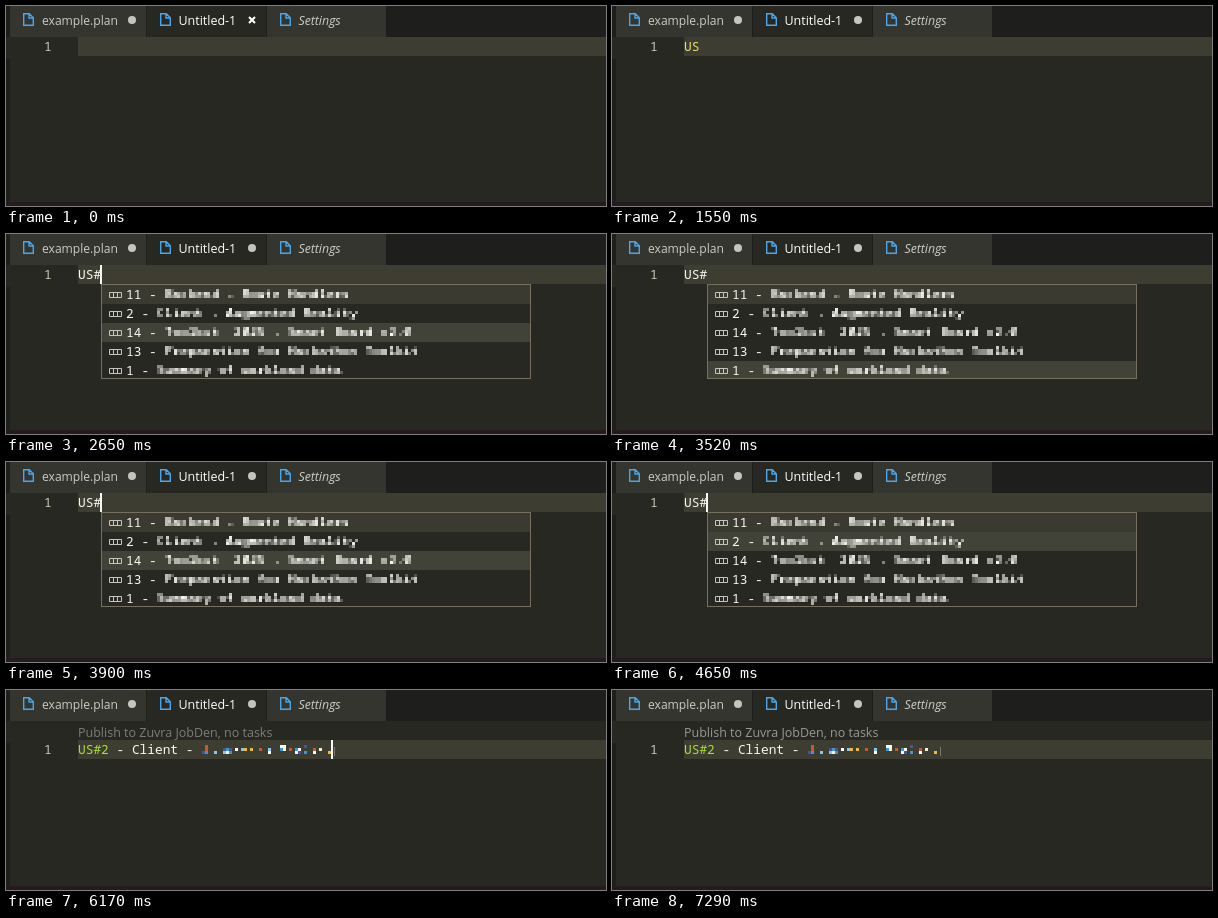
Animation of 600 by 200 pixels, one loop 7.42 s. Source, as an HTML page with a canvas:

```html
<!DOCTYPE html>
<html lang="en">
<head>
<meta charset="utf-8">
<title>Plan editor</title>
<style>
  html, body { margin: 0; width: 100%; height: 100%; overflow: hidden; background: #272822; }
  canvas { display: block; width: 600px; height: 200px; }
</style>
</head>
<body>
<canvas id="stage" width="600" height="200"></canvas>
<script>
const LOOP = 7420;
const CHAR = 7.7, CELL = 3, LEFT = 72;
const MONO = '12.83px "Noto Sans Mono", "DejaVu Sans Mono", monospace';
const ui = (size, style = '') => `${style} ${size}px "Open Sans", "Noto Sans", sans-serif`;
const WHITE = '#f8f8f2', YELLOW = '#e6db74', GREEN = '#a6e22e', GREY = '#c5c5c0';
const BLOCKS = ['#ffffff', '#fbf3cf', '#ffffff', '#3f97d0', '#c9572f', '#e9b949', '#f4f4ea', '#8ec3e6', '#4552a8'];

const ITEMS = [
  ['11', 'Backend - Route Handlers'],
  ['2', 'Client - Augmented Reality'],
  ['14', 'Toolkit  2025 - Smart Board v2.0'],
  ['13', 'Preparation for Hackathon Toolkit'],
  ['1', 'Summary of workload data'],
];
const PREFIX = 'US#2', MIDDLE = ' - Client - ', TOPIC = 'Augmented Reality';

// Each list holds [start time, value]; a value stays until the next entry.
const typed = [[0, ''], [980, 'U'], [1050, 'US'], [1680, 'US#'], [4770, PREFIX]];
const typedColor = [[0, YELLOW], [1680, WHITE], [4840, GREEN]];
const selected = [[0, -1], [1730, 2], [3340, 3], [3520, 4], [3770, 3], [3900, 2], [4080, 1], [4770, -1]];
const lensAlpha = [[0, 0], [5910, 0.25], [6030, 0.5], [6170, 0.75], [6360, 1]];
const cursor = [480, 1550, 1680, 2170, 2650, 3160, 3650, 4150, 4650, 5340, 5770, 6290, 6790, 7290];

const at = (steps, t) => steps.filter(([start]) => start <= t).pop()[1];
const cursorOn = t => cursor.filter(start => start <= t).length % 2 === 1;

const g = document.getElementById('stage').getContext('2d');

function rect(color, x, y, w, h) {
  g.fillStyle = color;
  g.fillRect(x, y, w, h);
}

function label(text, x, y, color, font = MONO) {
  g.font = font;
  g.fillStyle = color;
  g.fillText(text, x, y);
}

function line(color, width, path) {
  g.strokeStyle = color;
  g.lineWidth = width;
  g.stroke(new Path2D(path));
}

function dot(x, y) {
  g.fillStyle = GREY;
  g.beginPath();
  g.arc(x, y, 4, 0, 7);
  g.fill();
}

// Redacted text: glyphs rendered small, then enlarged as square cells.
function mosaic(text, palette) {
  const small = document.createElement('canvas');
  small.width = Math.ceil(text.length * CHAR / CELL);
  small.height = 5;
  const s = small.getContext('2d');
  s.scale(1 / CELL, 1 / CELL);
  s.font = MONO;
  s.fillStyle = '#fff';
  s.fillText(text, 0, 10);
  const image = s.getImageData(0, 0, small.width, small.height).data;

  const big = document.createElement('canvas');
  big.width = small.width * CELL;
  big.height = small.height * CELL;
  const b = big.getContext('2d');
  let seed = 11;
  for (let i = 0; i < small.width * small.height; i++) {
    seed = (seed * 16807) % 2147483647;
    const ink = image[i * 4 + 3] / 255;
    if (ink < (palette ? 0.42 : 0.12)) continue;
    b.globalAlpha = palette ? 1 : Math.min(1, ink * 1.6);
    b.fillStyle = palette ? palette[seed % palette.length] : WHITE;
    b.fillRect(i % small.width * CELL, Math.floor(i / small.width) * CELL, CELL, CELL);
  }
  return big;
}

const titles = ITEMS.map(([, title]) => mosaic(title));
const topic = mosaic(TOPIC, BLOCKS);

function fileIcon(x) {
  g.save();
  g.translate(x, 7);
  line('#4ba5e8', 1.4, 'M.7.7H6.3L10.3 4.7V12.3H.7ZM6 .7V5H10.3');
  g.restore();
}

function tabs(dirty) {
  rect('#1e1f1c', 0, 0, 600, 31);
  rect('#34352f', 4, 0, 136, 31);
  rect('#272822', 141, 0, 119, 31);
  rect('#34352f', 261, 0, 119, 31);
  [17, 154, 274].forEach(fileIcon);
  label('example.plan', 36, 19, '#ccccc7', ui(12.1));
  label('Untitled-1', 172.5, 19, '#ffffff', ui(12.5));
  label('Settings', 292.5, 19, '#ccccc7', ui(12.4, 'italic'));
  dot(126, 14);
  if (dirty) dot(246, 14);
  else line('#ffffff', 2, 'M243 11L249 17M249 11L243 17');
}

function popup(choice) {
  rect('#75715e', 95, 50, 430, 95);
  rect('#272822', 96, 51, 428, 93);
  ITEMS.forEach(([id], i) => {
    const y = 51 + i * 19;
    const h = Math.min(19, 144 - y);
    if (i === 0) rect('#3a3a31', 96, y, 428, h);
    if (i === choice) rect('#414339', 96, y, 428, h);
    line('#c5c5c0', 1, `M103.5 ${y + 7.5}h12v5h-12zM107.5 ${y + 7.5}v5M111.5 ${y + 7.5}v5`);
    label(id + ' -', 120, y + 14, WHITE);
    g.drawImage(titles[i], Math.round(120 + (id.length + 3) * CHAR), y + 4);
  });
}

function draw(t) {
  const text = at(typed, t);
  const done = text === PREFIX;
  const top = t >= 5270 ? 50 : 31;
  const choice = at(selected, t);
  const length = done ? (PREFIX + MIDDLE + TOPIC).length : text.length;

  rect('#272822', 0, 0, 600, 200);
  rect('#1e1f1c', 0, 53, 4, 143);
  tabs(text !== '');
  rect('#3e3d32', LEFT, top, 528, 19);
  label('1', 38, top + 14, '#c6c6b4');
  label(text, LEFT, top + 14, at(typedColor, t));
  if (done) {
    label(MIDDLE, LEFT + PREFIX.length * CHAR, top + 14, WHITE);
    g.drawImage(topic, 196, top + 5);
    rect('#77766a', 328, top + 7, 1, 9);
  }
  if (cursorOn(t)) {
    const x = Math.max(LEFT, Math.round(LEFT + length * CHAR) - 1);
    rect(WHITE, x, top, 2, 19);
  }

  g.globalAlpha = at(lensAlpha, t);
  label('Publish to Zuvra JobDen, no tasks', LEFT, 47, '#999999', ui(12.5));
  g.globalAlpha = 1;

  if (choice >= 0) popup(choice);
  rect('#251a1d', 0, 196, 600, 4);
}

function tick() {
  draw(performance.now() % LOOP);
  requestAnimationFrame(tick);
}
tick();
</script>
</body>
</html>
```
